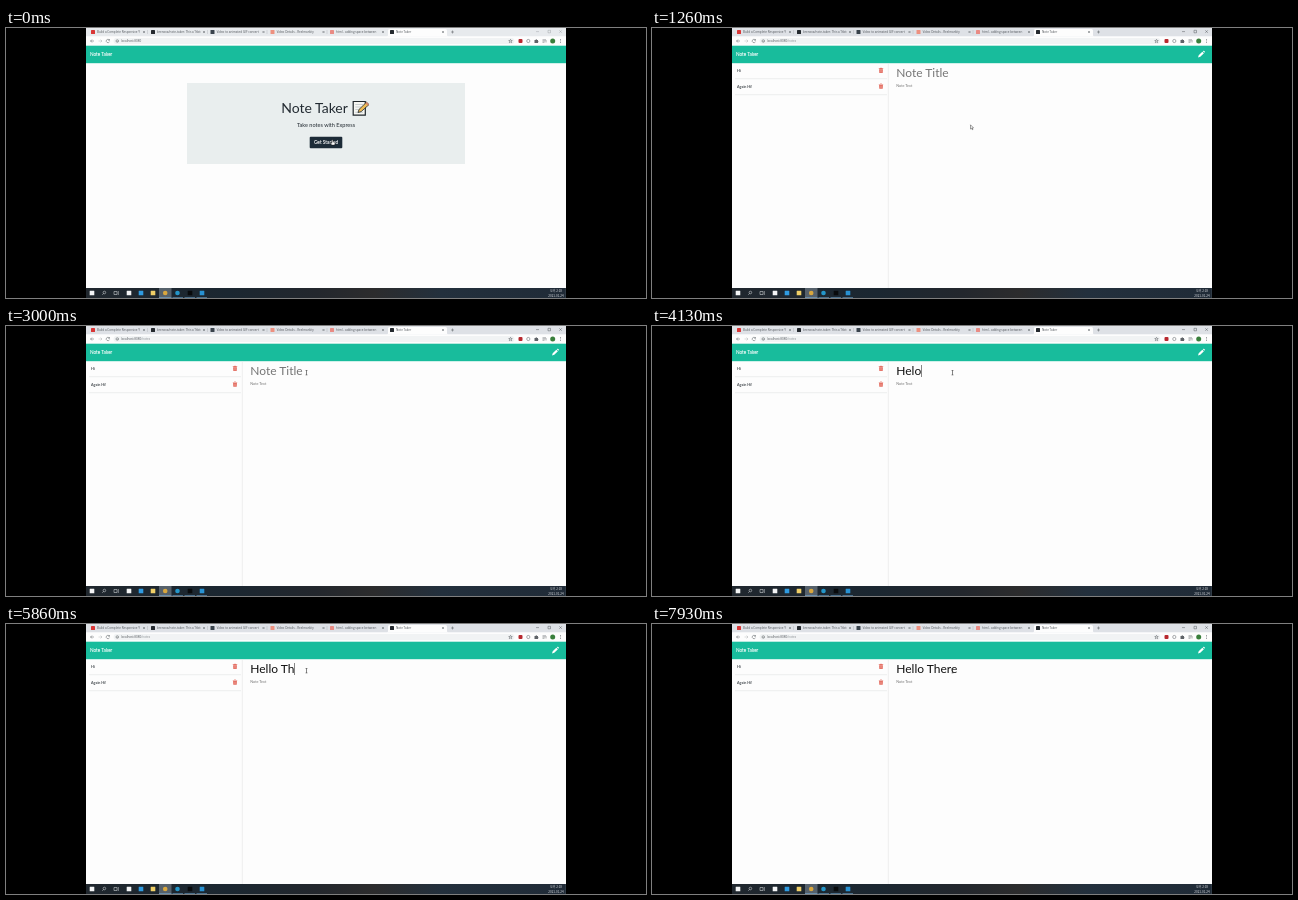
Animation of 640 by 270 pixels, one loop 8000 ms. Source, as an HTML page:

```html
<!DOCTYPE html>
<html lang="en">
<head>
<meta charset="utf-8">
<title>Note Taker</title>
<style>
  html, body { margin: 0; width: 100%; height: 100%; overflow: hidden; background: #000; }
  svg { display: block; width: 100%; height: 100%; }
  text { font-family: Lato, sans-serif; white-space: pre; }
  .ui text { font-family: "Open Sans", sans-serif; font-size: 3px; fill: #50555a; }
  .ui .clock { font-family: "Noto Sans CJK KR", "Noto Sans CJK", sans-serif; fill: #e8eaed; text-anchor: middle; }
  .line { fill: none; stroke: #555a5f; stroke-width: .5; }
</style>
</head>
<body>
<svg viewBox="0 0 640 270">
  <defs>
    <linearGradient id="bar">
      <stop offset="0" stop-color="#20272e"/><stop offset=".3" stop-color="#1b2731"/>
      <stop offset=".48" stop-color="#23272d"/><stop offset=".6" stop-color="#2c2c2d"/>
      <stop offset=".74" stop-color="#23303d"/><stop offset="1" stop-color="#202b37"/>
    </linearGradient>
    <g id="trash" fill="#e36a5e">
      <path d="M-2.2-2.3H-.9L-.5-2.8H.5L.9-2.3H2.2V-1.6H-2.2Z"/>
      <path d="M-1.9-1.2H1.9L1.7 2.6H-1.7Z"/>
      <path d="M-.8-.5V2M0-.5V2M.8-.5V2" stroke="#f4bdb7" stroke-width=".3"/>
    </g>
  </defs>
  <rect width="640" height="270"/>
  <rect x="80" width="480" height="261" fill="#fdfdfd"/>

  <g class="ui" id="browser">
    <rect id="strip" x="80" width="480" height="8.3" fill="#dee1e6"/>
    <path d="M381 8.5Q382 8 382 7V2.5Q382 1 383.500 1H439.500Q441 1 441 2.500V7Q441 8 442 8.500Z" fill="#fdfdfd"/>
    <path class="line" d="M445 4H448M446.500 2.500V5.500"/>
    <path id="controls" class="line" d="M530 3.600H533M542 2.300H544.500V4.800H542ZM553.300 2.300L555.800 4.800M555.800 2.300L553.300 4.800"/>
    <path class="line" d="M88 13H84.500L86 11.500M84.500 13L86 14.500"/>
    <path class="line" d="M92.500 13H96L94.500 11.500M96 13L94.500 14.500" stroke-opacity=".4"/>
    <path class="line" d="M103.300 12A1.700 1.700 0 1 0 103.500 13.600M103.500 11V12.300H102.200"/>
    <rect x="107.500" y="10" width="401" height="6" rx="3" fill="#f1f3f4"/>
    <circle class="line" cx="111.300" cy="13" r="1.300"/>
    <path class="line" d="M111.300 12.700V13.800"/>
    <text x="115" y="14.100">localhost:8080<tspan id="path" fill="#868b90"></tspan></text>
    <path class="line" d="M504.500 11.300L505 12.500 506.300 12.600 505.300 13.400 505.700 14.700 504.500 14 503.300 14.700 503.700 13.400 502.700 12.600 504 12.500Z" stroke-width=".35"/>
    <rect x="512.500" y="11" width="4" height="4" rx="1" fill="#b8292f"/>
    <circle class="line" cx="522.300" cy="13" r="1.600"/>
    <path d="M528.500 12H529.600A.7.7 0 0 1 531 12H532V13A.7.7 0 0 1 532 14.300V15H528.500Z" fill="#5f6368"/>
    <path class="line" d="M536.500 11.800H540M536.500 13H539M536.500 14.300H538.500M540 12V14.500"/>
    <circle cx="546.700" cy="13" r="2.500" fill="#397f3c"/>
    <path d="M554.500 11.200V14.900" stroke="#555a5f" stroke-width=".8" stroke-dasharray=".7 .7"/>
    <rect x="80" y="17.700" width="480" height="17.500" fill="#18bc9c"/>
    <g id="tabs"></g>
  </g>
  <text x="84" y="28.200" font-size="4.700" fill="#fff" stroke="#fff" stroke-width=".08">Note Taker</text>

  <g id="home">
    <rect x="181" y="55" width="278" height="81" fill="#e9eeee"/>
    <text x="275.200" y="84.700" font-size="14" fill="#222a31">Note Taker</text>
    <g transform="translate(346 72)">
      <path d="M1.200 1.500H13.300V15.200H1.200Z" fill="#f6f6f2" stroke="#20272b" stroke-width="1.200"/>
      <path d="M3.300 4.500H11M3.300 7H9M3.300 9.500H7M3.300 12.300H11" stroke="#b5bdc0" stroke-width=".7"/>
      <path d="M6 12.500L7 9.500 14.500 2.200 17 4.600 9.200 11.600Z" fill="#edbb52" stroke="#20272b" stroke-width=".8"/>
      <path d="M13.400 3.300L14.600 2.100 17 4.600 15.800 5.700Z" fill="#d98868"/>
    </g>
    <text x="320" y="99.300" font-size="5.550" fill="#222a31" text-anchor="middle">Take notes with Express</text>
    <rect x="303.700" y="108.700" width="32.600" height="11.600" rx="1" fill="#1c2b37"/>
    <text x="320" y="116.200" font-size="4.800" fill="#fff" stroke="#fff" stroke-width=".08" text-anchor="middle">Get Started</text>
  </g>

  <g id="notes">
    <path d="M83 50.700H235M83 66.700H235M236.300 35.200V260" stroke="#e2e4e5" stroke-width=".6"/>
    <g font-size="3.700" font-weight="700" fill="#42484d">
      <text x="85" y="44.300">Hi</text><text x="85" y="60">Again Hi!</text>
    </g>
    <use href="#trash" x="229" y="42.500"/><use href="#trash" x="229" y="58.200"/>
    <path d="M546 29.500L546.700 27.200 550.300 23.700 551.900 25.300 548.300 28.800ZM550.800 23.200L551.400 22.700Q552 22.500 552.900 23.600 553 24 552.400 24.800Z" fill="#fff"/>
    <text id="title" x="244.300" y="49.100" font-size="12"></text>
    <text x="244.300" y="59" font-size="3.750" fill="#757575">Note Text</text>
    <rect id="caret" width=".5" fill="#111"/>
  </g>

  <g class="ui" id="status">
    <rect x="80" y="254.300" width="30" height="6" fill="#dee1e6"/>
    <text x="81" y="258.500">localhost:8080/notes</text>
  </g>

  <g class="ui">
    <rect x="80" y="260" width="480" height="10" fill="url(#bar)"/>
    <rect x="153" y="260" width="12.500" height="10" fill="#56616b"/>
    <path d="M153 269.700H165.500M166.500 269.700H177M178.500 269.700H189M190.500 269.700H201" stroke="#79b9e7" stroke-width=".6"/>
    <g class="line" style="stroke:#e5e8eb">
      <circle cx="98.400" cy="264.500" r="1.300"/><path d="M97.500 265.500L96.300 266.800M108 263.500H111V266.500H108ZM112.300 263V267"/>
    </g>
    <g id="apps"></g>
    <text class="clock" x="550" y="264.200">오후 2:18</text>
    <text class="clock" x="550" y="268.700">2021-01-24</text>
    <path d="M559.500 260V270" stroke="#59636d" stroke-width=".3"/>
  </g>

  <path id="hand" d="M-.6-2.300Q0-2.900.5-2.300V-.5L2.100-.1Q2.700.1 2.600.8L2.200 2.800H-.9L-2.200.7Q-2.100 0-1.400.4L-.6 1Z" fill="#fff" stroke="#111" stroke-width=".5"/>
  <path id="arrow" d="M0 0V4.200L1 3.300 1.700 4.900 2.400 4.600 1.700 3.100H3Z" fill="#fff" stroke="#111" stroke-width=".4"/>
  <path id="beam" d="M-.9-2.200H.9M0-2.200V2.200M-.9 2.200H.9" fill="none" stroke="#333" stroke-width=".6"/>
</svg>
<script>
const el = id => document.getElementById(id);
const show = (id, on) => el(id).setAttribute("visibility", on ? "visible" : "hidden");
const place = (id, x, y) => el(id).setAttribute("transform", `translate(${x} ${y})`);

// Left edge, icon colour, title
const tabs = [
  [85, "#d93636", "Build a Complete Responsive Y"],
  [145, "#24292e", "brenova/note-taker: This a 'Note"],
  [204.500, "#39434c", "Video to animated GIF convert"],
  [264.500, "#ed9180", "Video Details - Reelmarkity"],
  [324, "#e98b84", "html - adding space between"],
  [384, "#24292e", "Note Taker"]
];
el("tabs").innerHTML = tabs.map(([x, color, title], i) => `
  <rect x="${x}" y="2" width="4" height="4" rx=".6" fill="${color}"/>
  <svg x="${x + 6}" width="43.500" height="8"><text y="5.100">${title}</text></svg>
  <path class="line" d="M${x + 52} 3L${x + 54} 5M${x + 54} 3L${x + 52} 5"/>
  ${i < 4 ? `<path d="M${x + 56.500} 2V6" stroke="#a5a8ad" stroke-width=".35"/>` : ""}`).join("");

const apps = [
  [86, "#f4f5f6"], [123, "#f4f5f6"], [135, "#2f9be1"], [147, "#f0cf67"],
  [159.200, "#d9a73e", true], [171.500, "#2496c9", true], [184, "#080a0c"], [196, "#2892d3"]
];
el("apps").innerHTML = apps.map(([x, color, round]) =>
  `<rect x="${x - 2.300}" y="262.700" width="4.600" height="4.600" rx="${round ? 2.300 : .3}" fill="${color}"/>`).join("");

const LOOP = 8000, OPEN = 400, CLICK = 3150, TAB = 7050;
const typing = [
  [3400, "H"], [3580, "He"], [3760, "Hel"], [3960, "Helo"], [4500, "Hel"],
  [4720, "Hell"], [4950, "Hello"], [5200, "Hello "], [5480, "Hello T"],
  [5740, "Hello Th"], [5990, "Hello The"], [6220, "Hello Ther"], [6460, "Hello There"]
];

function drawPointer(t) {
  const nudge = Math.min(t / OPEN, 1);
  const p = Math.max(0, Math.min(1, (t - 1000) / 750));
  const ease = p * p * (3 - 2 * p);
  const x = 326.500 - nudge - 25 * ease;
  const y = 114.300 + 2 * nudge - 69.800 * ease;
  const kind = p === 0 ? "hand" : y < 52 ? "beam" : "arrow";
  for (const id of ["hand", "arrow", "beam"]) show(id, id === kind);
  place(kind, kind === "beam" ? 300.500 : x, kind === "beam" ? Math.max(y, 46.700) : y);
}

function drawTitle(t) {
  const key = typing.filter(([at]) => at <= t).pop();
  const title = el("title");
  title.textContent = key ? key[1] : "Note Title";
  title.setAttribute("fill", key ? "#111" : "#757575");
  const inBody = t >= TAB;
  const since = t - (inBody ? TAB : key ? key[0] : CLICK);
  const caret = el("caret");
  const width = key && !inBody ? title.getComputedTextLength() : 0;
  caret.setAttribute("x", 244.300 + width);
  caret.setAttribute("y", inBody ? 55.500 : 39);
  caret.setAttribute("height", inBody ? 4.300 : 12);
  show("caret", t >= CLICK && since % 1000 < 500);
}

function draw(now) {
  const t = now % LOOP;
  const opened = t >= OPEN;
  show("home", !opened);
  show("notes", opened);
  show("status", t >= 150 && t < 1080);
  el("path").textContent = opened ? "/notes" : "";
  el("strip").setAttribute("fill", t < 150 ? "#e7eaed" : "#dee1e6");
  el("controls").setAttribute("stroke-opacity", t < 150 ? .45 : 1);
  drawTitle(t);
  drawPointer(t);
  requestAnimationFrame(draw);
}
requestAnimationFrame(draw);
</script>
</body>
</html>
```
